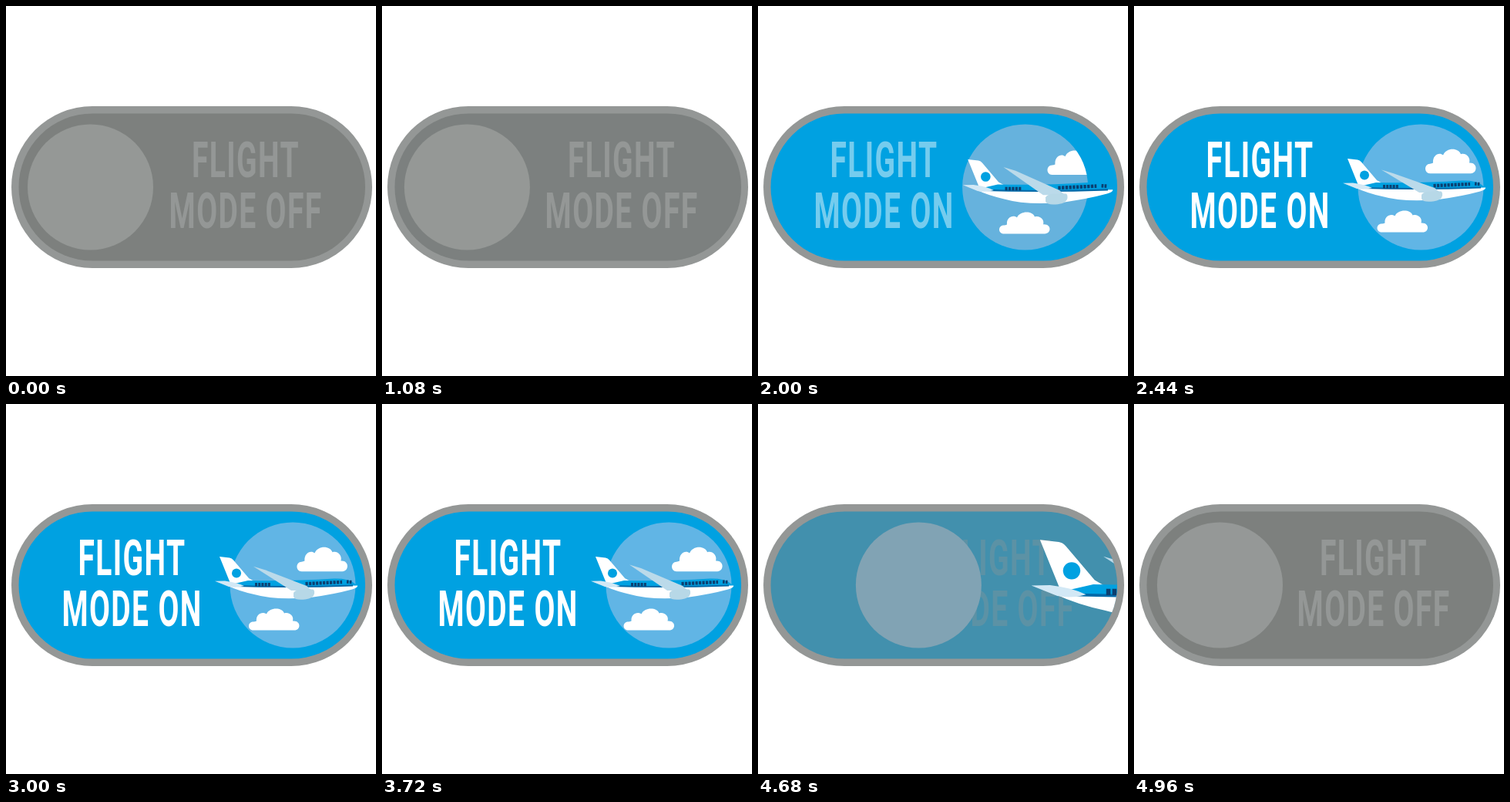
Recreate the animation shown at these times as an HTML page. Size 480 px wide and 480 px high, loop 5000 ms.

```html
<!DOCTYPE html>
<html lang="en">
<head>
<meta charset="utf-8">
<title>Flight mode switch</title>
<style>
  html, body { margin: 0; width: 100%; height: 100%; overflow: hidden; background: #fff; }
  svg { display: block; width: 100vw; height: 100vh; }
  text { font: 700 65px Roboto, "Liberation Sans", sans-serif; letter-spacing: 2.3px; text-anchor: middle; }
  .off { fill: #949796; }
  .on { fill: #fff; }
</style>
</head>
<body>
<svg viewBox="0 0 480 480">
  <defs>
    <clipPath id="pillClip"><rect x="16.5" y="139.5" width="449.5" height="191" rx="95.5"/></clipPath>
    <clipPath id="knobClip"><circle id="knobHole" cy="235" r="81.5"/></clipPath>
    <path id="cloud" d="M6 28C-2 28-2 17 6 17Q8 17 10 16C9 7 18 3 23 7C27-2 43-2 46 6C53 4 59 10 57 16C68 15 68 28 59 28Z"/>
  </defs>

  <rect x="7" y="130" width="468" height="210" rx="105" fill="#949796"/>
  <rect id="track" x="16.5" y="139.5" width="449.5" height="191" rx="95.5"/>

  <!-- condensed lettering -->
  <g id="offText" class="off">
    <g transform="translate(311) scale(.6 1)"><text y="222">FLIGHT</text><text y="288">MODE OFF</text></g>
  </g>
  <g id="onText" class="on">
    <g transform="translate(163.5) scale(.6 1)"><text y="222">FLIGHT</text><text y="288">MODE ON</text></g>
  </g>

  <circle id="knob" cy="235" r="81.5"/>

  <g clip-path="url(#knobClip)">
    <g id="clouds" fill="#fff">
      <use href="#cloud" transform="translate(378 185.5) scale(1 1.13)"/>
      <use href="#cloud" transform="translate(315.5 265.5)"/>
    </g>
  </g>

  <g clip-path="url(#pillClip)">
    <g id="plane">
      <path fill="#fff" d="M277 198L290 199.5Q293 200 295 202.5L315 226L322 230L292 235Z"/>
      <circle cx="299" cy="219.5" r="6" fill="#00a1e1"/>
      <path fill="#00a1e1" d="M290 234.5L314 229Q375 230 425 226.5Q444 226 451 232L456 236L440 237H294Z"/>
      <path fill="#fff" d="M287 235.5L380 237L456 235.5Q457 238 449 240.5Q425 247 395 251Q350 255 322 247Q303 243 287 235.5Z"/>
      <path fill="none" stroke="#0069a8" stroke-width="2" d="M289 235.8Q370 238.5 450 235.5"/>
      <g fill="none" stroke="#0b3f70" stroke-width="4.4">
        <path stroke-dasharray="3 1.2" d="M323 234.2H343.5"/>
        <path stroke-dasharray="3.2 1.3" d="M388.5 233.2L436 231"/>
        <path stroke-dasharray="2.6 1.2" d="M442 230.6L448.6 231"/>
      </g>
      <path fill="#d2e8f5" d="M271 229.8L284 229.5Q300 231.5 309 236Q299 239 289 237Z"/>
      <path id="wing" fill="#bbdaea"/>
      <path fill="#b7d8e7" d="M373 245Q375 240.5 386 240.5H398Q400.500 241 400 246Q399 252 388 253.500Q375 255 373 250Z"/>
    </g>
  </g>
</svg>

<script>
const el = id => document.getElementById(id);
const set = (id, attrs) => Object.entries(attrs).forEach(([k, v]) => el(id).setAttribute(k, v));
const ramp = (t, a, b) => Math.min(1, Math.max(0, (t - a) / (b - a)));
const ease = (t, a, b) => { const u = ramp(t, a, b); return u * u * (3 - 2 * u); };
const mix = (from, to, p) => `rgb(${from.map((v, i) => Math.round(v + (to[i] - v) * p))})`;

function draw(t) {
  const slide = ease(t, 1040, 2230) - ease(t, 4235, 5000);
  const tint = ease(t, 1040, 2000) - ease(t, 4380, 4960);
  const cx = 109.5 + 262.5 * slide;
  set("track", { fill: mix([125, 128, 126], [0, 161, 225], tint) });
  set("knob", { cx, fill: mix([149, 152, 150], [97, 181, 229], slide) });
  set("knobHole", { cx });
  set("offText", { opacity: 1 - ramp(t, 1080, 1800) + ramp(t, 4560, 4940) });
  set("onText", { opacity: ramp(t, 1780, 2260) - ramp(t, 4230, 4580) });

  const settle = 1 - ease(t, 1720, 2400);
  const drift = 3.7 * ramp(t, 2440, 4400) ** 1.5;
  set("clouds", { transform: `translate(${-4 * settle - drift} ${3 * settle})` });

  // the plane arrives from the left and leaves, growing, to the right
  const leave = ramp(t, 4200, 4800) ** 2;
  const x = -480 * (1 - ramp(t, 1160, 1760)) ** 3 + 340 * ramp(t, 4390, 4800) ** 2;
  const y = 4.5 * settle + 16 * leave;
  const size = 1 + 0.08 * settle + 1.35 * leave;
  set("plane", {
    transform: `translate(${372 + x} ${235 + y}) scale(${size}) translate(-372 -235)`,
    visibility: t > 1160 && t < 4800 ? "visible" : "hidden"
  });
  const tip = 212.5 - 8 * settle - 4 * ease(t, 2440, 3720) + ease(t, 3720, 4400);
  set("wing", { d: `M321 ${tip}L336 ${tip + 4.5}L390 236L397 242L370 242Z` });
}

function tick() {
  draw(performance.now() % 5000);
  requestAnimationFrame(tick);
}
tick();
</script>
</body>
</html>
```
